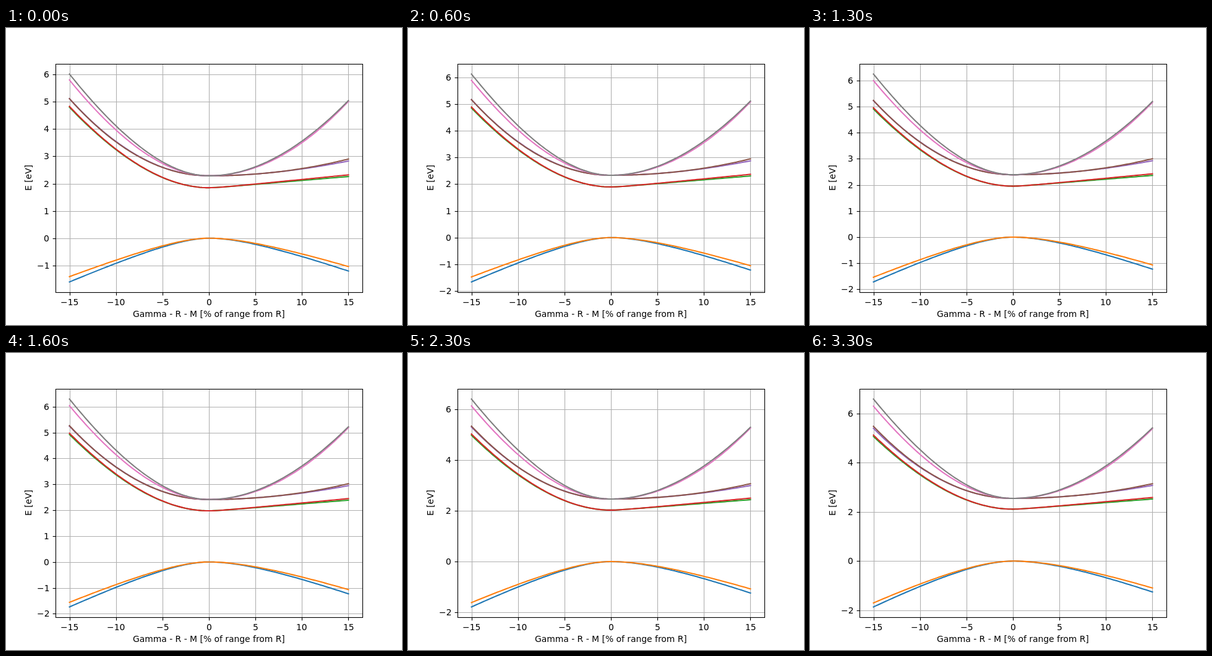
Animation, 640 px wide and 480 px high, one loop 3400 ms. Source, as an HTML page with a canvas:

```html
<!DOCTYPE html>
<html lang="en">
<head>
<meta charset="utf-8">
<title>Band structure near R</title>
<style>
  html, body { margin: 0; width: 100%; height: 100%; overflow: hidden; background: #fff; }
  canvas, svg { position: absolute; left: 0; top: 0; display: block; }
  text { font: 13.89px "DejaVu Sans", sans-serif; fill: #000; }
</style>
</head>
<body>
<canvas id="plot" width="640" height="480"></canvas>
<svg id="labels" width="640" height="480" viewBox="0 0 640 480"></svg>
<script>
const ctx = document.getElementById('plot').getContext('2d');
const svg = document.getElementById('labels');

const STEP = 100, COUNT = 34;
const LEFT = 80, RIGHT = 576, TOP = 57.6, BOTTOM = 427.2;
const THIN = 1.11, TICK = 4.86;
const SPAN = 15;

// One side of a band: its height at the far end, how much that grows
// over the loop, and how strongly the parabola straightens outwards.
const side = (end, grow, bow) => ({ end, grow, bow });

// ease: exponent of the growth in time; relax: loss of bow over the loop.
const valence = (color, left, right) =>
  ({ color, left, right, base: 0, lift: 0, ease: 0.9, relax: 0.33 });
const conduction = (color, base, left, right, ease = 1) =>
  ({ color, left, right, base, lift: 0.259, ease, relax: 0 });

const LOW = 1.85, HIGH = 2.287;
const bands = [
  valence('#1f77b4', side(-1.604, -0.258, 2.15), side(-1.205, -0.051, 1.6)),
  valence('#ff7f0e', side(-1.41, -0.29, 2), side(-1.04, -0.053, 1.5)),
  conduction('#2ca02c', LOW, side(2.95, 0, 0.23), side(0.411, 0, 16)),
  conduction('#d62728', LOW, side(2.98, 0.025, 0.24), side(0.473, 0, 11), 0.4),
  conduction('#9467bd', HIGH, side(2.829, 0.015, 0), side(0.543, -0.015, 0.15)),
  conduction('#8c564b', HIGH, side(2.829, 0.098, -0.03), side(0.616, -0.018, -0.08), 2),
  conduction('#e377c2', HIGH, side(3.513, 0.231, 0.27), side(2.731, 0.101, 0)),
  conduction('#7f7f7f', HIGH, side(3.731, 0.304, 0.4), side(2.76, 0.105, 0.12), 0.96)
];

function energy(band, x, u) {
  const { end, grow, bow } = x < 0 ? band.left : band.right;
  const t = Math.abs(x) / SPAN;
  const height = end + grow * u ** band.ease;
  const m = bow * (1 - band.relax * u);
  return band.base + band.lift * u + height * t * t * (1 + m) / (1 + m * t);
}

const px = x => LEFT + (x + 16.5) * (RIGHT - LEFT) / 33;
const snap = v => Math.floor(v + 0.5) + 0.5;
const name = v => String(v).replace('-', '\u2212');

ctx.font = '13.89px "DejaVu Sans", sans-serif';
const width = str => ctx.measureText(str).width;

function addText(str, x, y) {
  const el = document.createElementNS('http://www.w3.org/2000/svg', 'text');
  svg.appendChild(el);
  return setText(el, str, x, y);
}

// Text starts on whole pixels.
function setText(el, str, x, y) {
  el.textContent = str;
  el.setAttribute('x', Math.round(x));
  el.setAttribute('y', Math.round(y));
  return el;
}

const addCentered = (str, x, y) => addText(str, x - width(str) / 2, y);

const xTicks = [];
for (let x = -SPAN; x <= SPAN; x += 5) xTicks.push(x);
xTicks.forEach(x => addCentered(name(x), px(x), 448));
addCentered('Gamma - R - M [% of range from R]', 328, 467);
addText('E [eV]', 0, 0).setAttribute('transform', 'translate(41 263) rotate(-90)');
const yLabels = Array.from({ length: 10 }, () => addText('', 0, 0));

function line(x1, y1, x2, y2, color) {
  ctx.strokeStyle = color;
  ctx.lineWidth = THIN;
  ctx.lineCap = 'butt';
  ctx.beginPath();
  ctx.moveTo(x1, y1);
  ctx.lineTo(x2, y2);
  ctx.stroke();
}

function drawBand(band, u, py) {
  ctx.strokeStyle = band.color;
  ctx.lineWidth = 2.083;
  ctx.lineCap = 'square';
  ctx.lineJoin = 'round';
  ctx.beginPath();
  for (let x = -SPAN; x <= SPAN; x += 0.25) ctx.lineTo(px(x), py(energy(band, x, u)));
  ctx.stroke();
}

function draw(n) {
  const u = n / (COUNT - 1);
  const min = energy(bands[0], -SPAN, u);
  const max = energy(bands[bands.length - 1], -SPAN, u);
  const margin = (max - min) * 0.05;
  const lo = min - margin, hi = max + margin;
  const py = e => BOTTOM - (e - lo) * (BOTTOM - TOP) / (hi - lo);

  const gap = hi - lo > 9 ? 2 : 1;
  const yTicks = [];
  for (let v = Math.ceil(lo / gap) * gap; v <= hi; v += gap) yTicks.push(v || 0);

  ctx.fillStyle = '#fff';
  ctx.fillRect(0, 0, 640, 480);

  const x0 = snap(LEFT), x1 = snap(RIGHT), y0 = snap(TOP), y1 = snap(BOTTOM);
  for (const v of xTicks) {
    const x = snap(px(v));
    line(x, y0, x, y1, '#b0b0b0');
    line(x, y1, x, y1 + TICK, '#000');
  }
  for (const v of yTicks) {
    const y = snap(py(v));
    line(x0, y, x1, y, '#b0b0b0');
    line(x0 - TICK, y, x0, y, '#000');
  }

  bands.forEach(band => drawBand(band, u, py));

  ctx.strokeStyle = '#000';
  ctx.lineWidth = THIN;
  ctx.lineJoin = 'miter';
  ctx.strokeRect(x0, y0, x1 - x0, y1 - y0);

  yLabels.forEach((el, i) => {
    const str = i < yTicks.length ? name(yTicks[i]) : '';
    setText(el, str, 70.3 - width(str), str ? py(yTicks[i]) + 5 : 0);
  });
}

const start = performance.now();
let shown = -1;
function tick() {
  const n = Math.floor((performance.now() - start) / STEP) % COUNT;
  if (n !== shown) draw(shown = n);
  requestAnimationFrame(tick);
}
tick();
</script>
</body>
</html>
```
